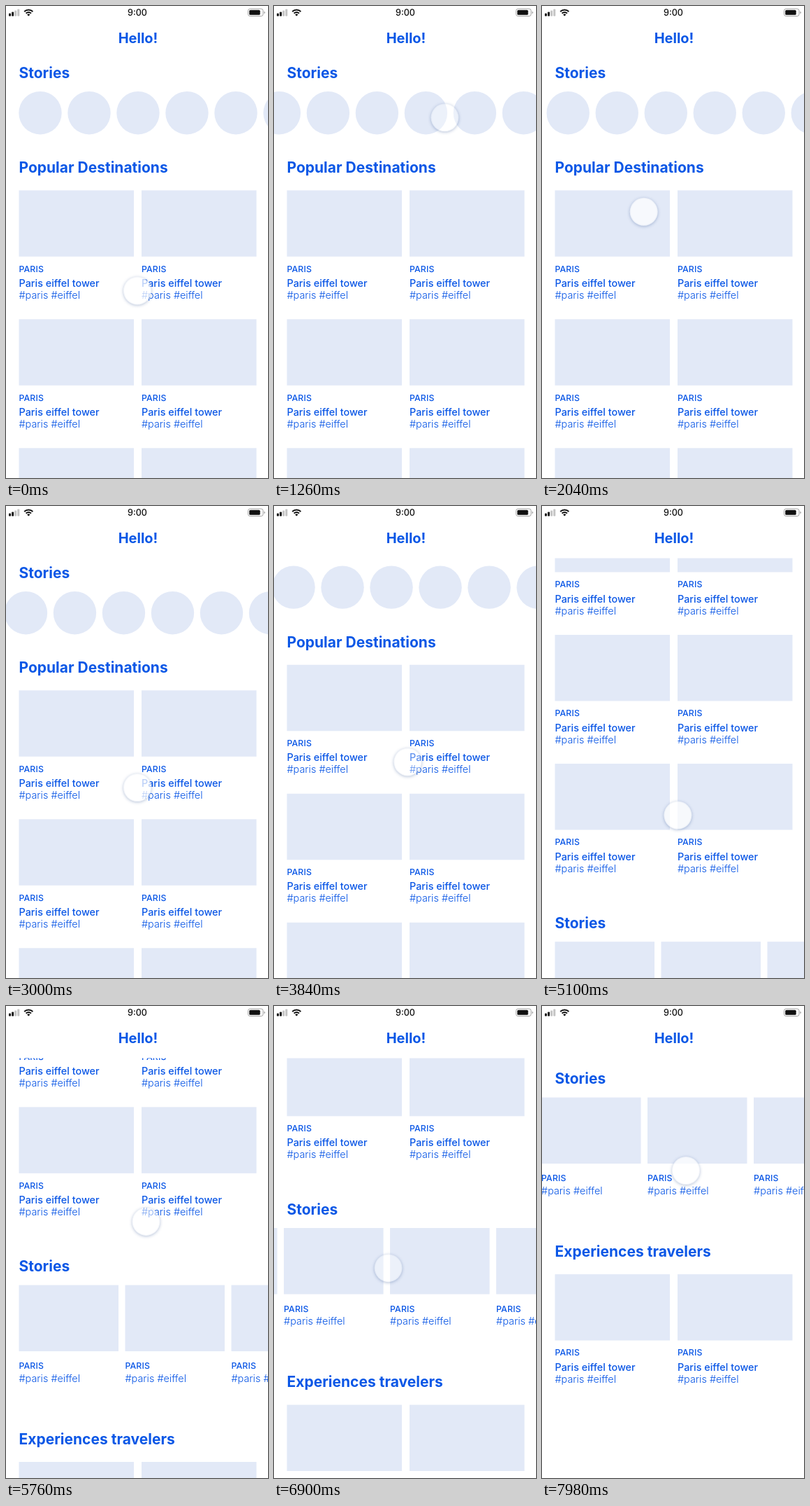
Animation of 375x674 px, one loop 8000 ms. Source, as an HTML page:

```html
<!DOCTYPE html>
<html lang="en">
<head>
<meta charset="utf-8">
<title>Travel app scroll</title>
<style>
  html, body { margin: 0; width: 100%; height: 100%; overflow: hidden; background: #fff; }
  svg { position: absolute; left: 0; top: 0; width: 375px; height: 674px; }
  text { font-family: Inter, Roboto, sans-serif; fill: #0b57e6; }
  .heading { font-size: 21px; font-weight: 700; }
  .place { font-size: 12.3px; font-weight: 500; letter-spacing: .1px; }
  .title { font-size: 14.4px; font-weight: 500; }
  .tags { font-size: 14.4px; font-weight: 300; }
  .hello { font-size: 20px; font-weight: 700; text-anchor: middle; }
  .clock { font-size: 12.6px; font-weight: 500; text-anchor: middle; fill: #111; }
  .fill { fill: #e2e9f7; }
  #finger {
    position: absolute; left: -20px; top: -20px; width: 40px; height: 40px;
    border-radius: 50%;
    box-shadow: 0 1px 4px rgba(40, 75, 140, .34), inset 0 0 2px rgba(70, 105, 170, .2);
  }
</style>
</head>
<body>
<svg viewBox="0 0 375 674">
  <g id="page">
    <g id="circles"></g>
    <g id="cards"></g>
  </g>
  <rect width="375" height="74.5" fill="#fff"/>
  <g id="signal"></g>
  <path d="M26.2 8a8.6 8.6 0 0 1 12.2 0M28.6 10.5a5.2 5.2 0 0 1 7.4 0"
    fill="none" stroke="#111" stroke-width="1.9"/>
  <path d="M32.3 14.4l-2.1-2.2a3 3 0 0 1 4.2 0z" fill="#111"/>
  <rect x="346.5" y="4" width="21.5" height="10.5" rx="2.8" fill="none" stroke="#a5a5a5"/>
  <rect x="348.2" y="5.7" width="15.5" height="7.1" rx="1.5" fill="#111"/>
  <path d="M369.4 7.5v3.6q1.5-.4 1.5-1.8t-1.5-1.8" fill="#a5a5a5"/>
  <text class="clock" x="188" y="13.6">9:00</text>
  <text class="hello" x="189" y="53">Hello!</text>
</svg>
<div id="finger"></div>
<script>
const LOOP = 8000, MARGIN = 18.5;
const get = id => document.getElementById(id);
const page = get('page'), circles = get('circles'), cards = get('cards'), finger = get('finger');

function add(parent, tag, attrs, content = '') {
  const el = document.createElementNS('http://www.w3.org/2000/svg', tag);
  for (const key in attrs) el.setAttribute(key, attrs[key]);
  el.textContent = content;
  parent.append(el);
}
const label = (parent, cls, x, y, content) => add(parent, 'text', { class: cls, x, y }, content);
const heading = (y, content) => label(page, 'heading', MARGIN, y, content);
const box = (parent, x, y, width) =>
  add(parent, 'rect', { class: 'fill', x, y, width, height: 94.5 });

function destinationRow(y) {
  for (const x of [MARGIN, 194]) {
    box(page, x, y, 164.5);
    label(page, 'place', x, y + 116.2, 'PARIS');
    label(page, 'title', x, y + 137.6, 'Paris eiffel tower');
    label(page, 'tags', x, y + 154.6, '#paris #eiffel');
  }
}

function storyCard(x) {
  box(cards, x, 885.5, 142.5);
  label(cards, 'place', x, 1005.3, 'PARIS');
  label(cards, 'tags', x, 1023.5, '#paris #eiffel');
}

heading(103.3, 'Stories');
for (let i = 0; i < 10; i++)
  add(circles, 'circle', { class: 'fill', cx: 49 + 70 * i, cy: 152.7, r: 30.7 });
heading(238.3, 'Popular Destinations');
for (let i = 0; i < 3; i++) destinationRow(263.3 + 184 * i);
heading(866.3, 'Stories');
for (let i = 0; i < 6; i++) storyCard(MARGIN + 152 * i);
heading(1112.8, 'Experiences travelers');
destinationRow(1138);
for (let i = 0; i < 4; i++)
  add(get('signal'), 'rect', { x: 4 + 4.1 * i, y: 10.5 - 2 * i, width: 3, height: 4 + 2 * i,
    rx: .8, fill: i < 2 ? '#111' : '#c4c4c4' });

// A drag pulls its layer along with the finger; the fling is the glide after release.
const drag = (layer, start, end, from, to, fling) => ({ layer, start, end, from, to, fling });
const drags = [
  drag('circles', 1125, 1565, [286, 158], [95, 164], 40),
  drag('page', 3500, 4700, [188, 402], [206, 206], 95),
  drag('page', 5250, 5700, [192, 490], [199, 307], 97),
  drag('cards', 6560, 7060, [320, 378], [117, 373], 128),
  drag('page', 7200, 7620, [196, 419], [206, 235], 0),
];
const TRAVEL = 900, GLIDE = 325, RELEASE = 150;
const clamp = u => Math.min(1, Math.max(0, u));
const ease = u => (1 - Math.cos(Math.PI * clamp(u))) / 2;
const blend = (a, b, u) => a.map((v, i) => v + (b[i] - v) * u);

function offset(layer, time) {
  const axis = layer === 'page' ? 1 : 0;
  return drags.filter(d => d.layer === layer).reduce((sum, d) => {
    const pulled = (d.to[axis] - d.from[axis]) * ease((time - d.start) / (d.end - d.start));
    const glided = d.fling * (1 - Math.exp(-Math.max(0, time - d.end) / GLIDE));
    return sum + pulled - glided;
  }, 0);
}

function fingerAt(time) {
  let end = 0, rest = [188, 406.5];
  for (const d of drags) {
    if (time < d.start)
      return blend(rest, d.from, ease((time - end) / Math.min(TRAVEL, d.start - end)));
    if (time < d.end) return blend(d.from, d.to, ease((time - d.start) / (d.end - d.start)));
    ({ end, to: rest } = d);
  }
  return rest;
}

const pressAt = time => Math.max(...drags.map(d =>
  Math.min(clamp((time - d.start) / RELEASE + 1), clamp((d.end - time) / RELEASE + 1))));

const begin = performance.now();
function draw() {
  const time = (performance.now() - begin) % LOOP;
  const [x, y] = fingerAt(time);
  page.setAttribute('transform', `translate(0 ${offset('page', time)})`);
  circles.setAttribute('transform', `translate(${offset('circles', time)} 0)`);
  cards.setAttribute('transform', `translate(${offset('cards', time)} 0)`);
  finger.style.transform = `translate(${x}px, ${y}px)`;
  finger.style.background = `rgba(255, 255, 255, ${.72 - .37 * pressAt(time)})`;
  requestAnimationFrame(draw);
}
draw();
</script>
</body>
</html>
```
